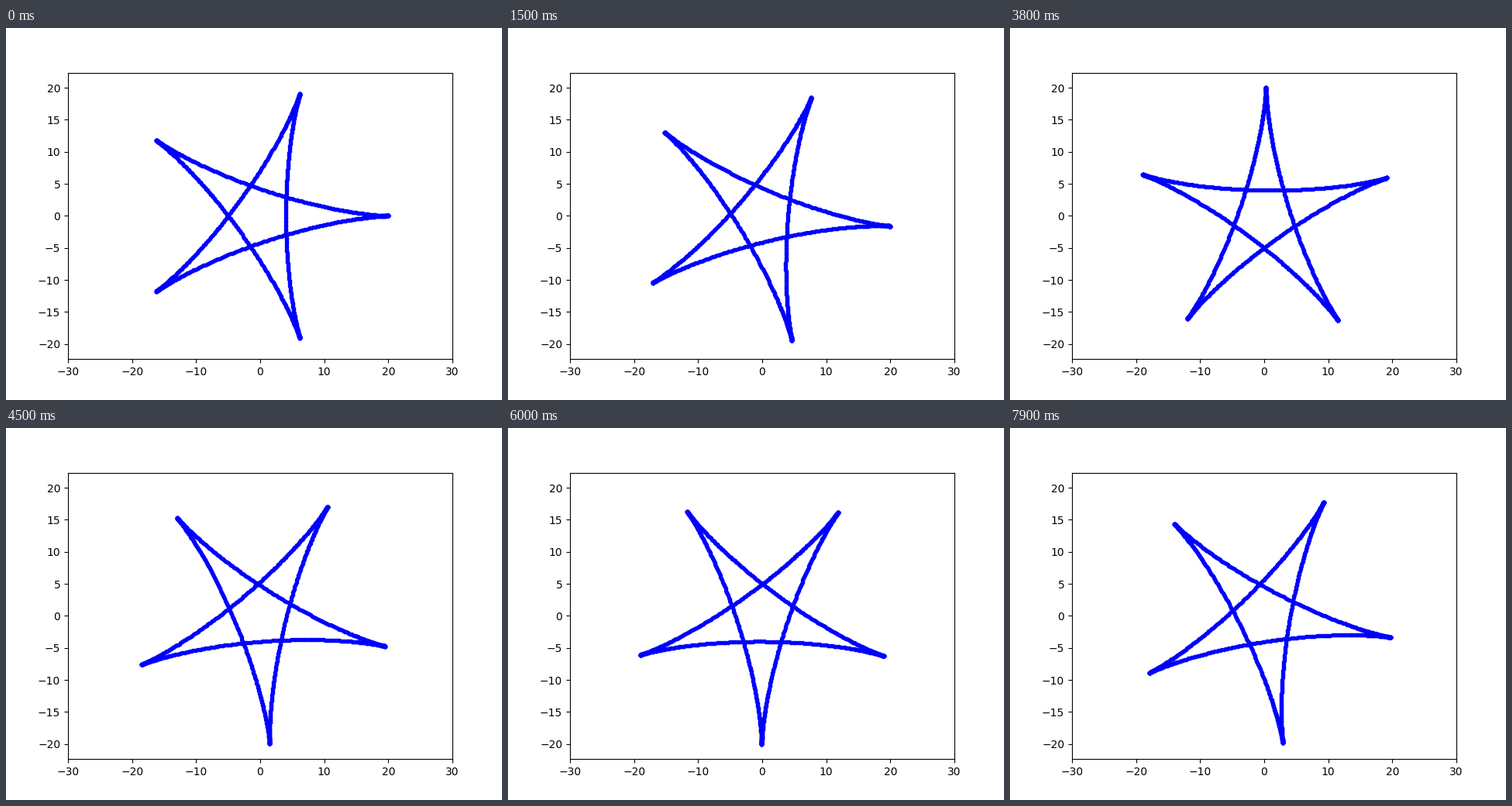
A matplotlib script for the animation above (8000 ms loop, 640 px wide and 480 px high).

```python
import numpy as np
import matplotlib.pyplot as plt
from matplotlib.animation import FuncAnimation

FRAMES = 80
INTERVAL = 100   # ms
SPIN = 1.0       # radians per frame
RADIUS, WHEEL = 20, 8

# Five-pointed hypocycloid, closed after two turns
t = np.linspace(0, 4 * np.pi, 1000)
arm = RADIUS - WHEEL
star = arm * np.exp(1j * t) + WHEEL * np.exp(-1j * t * arm / WHEEL)

fig, ax = plt.subplots(figsize=(6.4, 4.8), dpi=100)
half_height = 30 * (4.8 * 0.77) / (6.4 * 0.775)
ax.set_xlim(-30, 30)
ax.set_ylim(-half_height, half_height)
dots, = ax.plot([], [], "b.")


def update(frame):
    turned = star * np.exp(1j * SPIN * frame)
    dots.set_data(turned.real, turned.imag)
    return dots,


anim = FuncAnimation(fig, update, frames=FRAMES, interval=INTERVAL,
                     repeat=True, repeat_delay=0)
plt.show()
```
